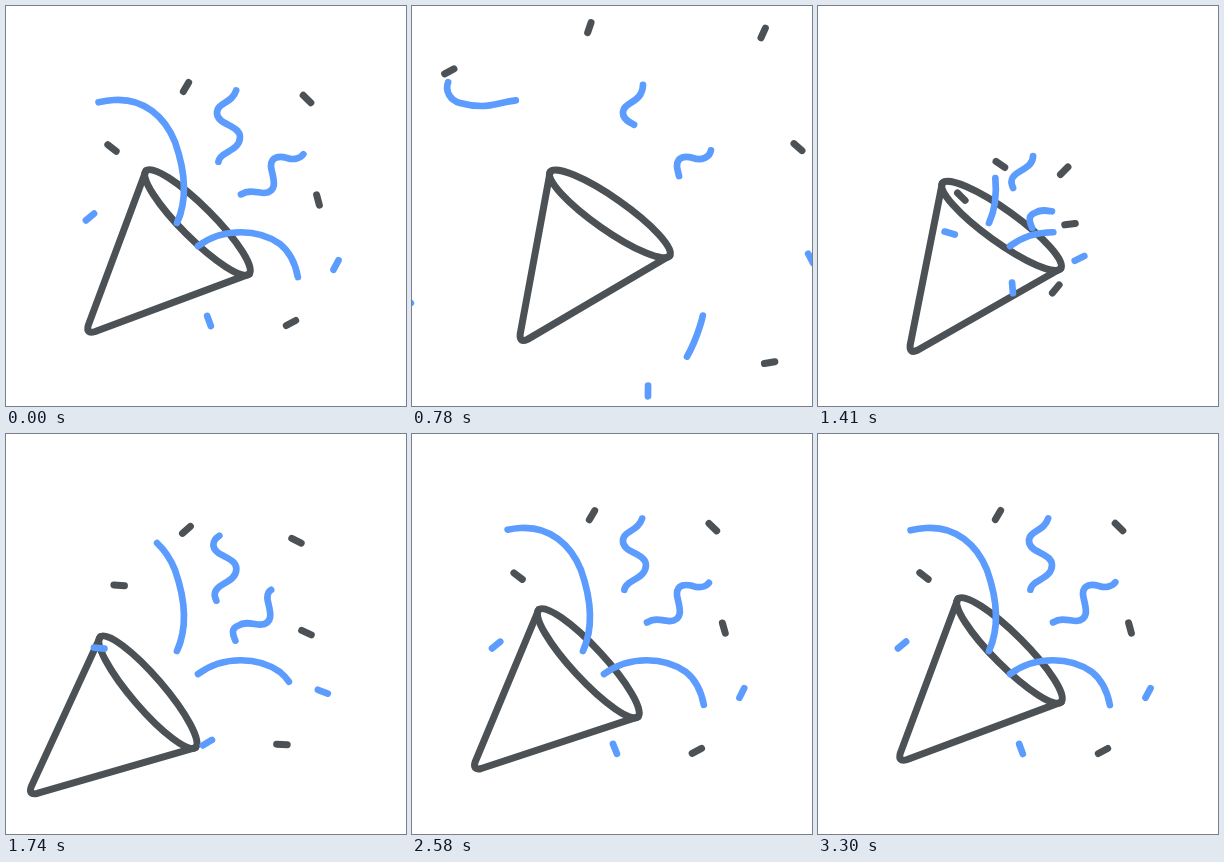
Animation of 400x400 px, one loop 5330 ms. Source, as an HTML page:

```html
<!DOCTYPE html>
<html lang="en">
<head>
<meta charset="utf-8">
<title>Party popper</title>
<style>
html, body { margin: 0; width: 100%; height: 100%; overflow: hidden; background: #fff; }
svg { display: block; width: 100%; height: 100%; }
path, ellipse { fill: none; stroke: #4b5154; stroke-width: 7; stroke-linecap: round; stroke-linejoin: round; }
.blue { stroke: #5c9cff; stroke-width: 6.7; }
</style>
</head>
<body>
<svg viewBox="0 0 400 400">
  <g id="cone">
    <ellipse rx="73" ry="16"/>
    <path d="M-73,0 L-4.5,150 Q0,158 4.5,150 L73,0"/>
  </g>
</svg>
<script>
const LOOP = 5330, STEP = 30, END = 3300, BURST = 1260, RECOIL = 1680;
const svg = document.querySelector('svg'), cone = document.getElementById('cone');

const ramp = (t, a, b) => Math.min(1, Math.max(0, (t - a) / (b - a)));
const smooth = u => u * u * (3 - 2 * u);
const easeOut = (u, p) => 1 - (1 - u) ** p;
const mix = (a, b, u) => a + (b - a) * u;
const show = (el, on) => el.setAttribute('visibility', on ? 'visible' : 'hidden');
const place = (el, x, y, a) => el.setAttribute('transform', `translate(${x} ${y}) rotate(${a})`);

function addPath(d, blue) {
  const p = document.createElementNS('http://www.w3.org/2000/svg', 'path');
  p.setAttribute('d', d);
  if (blue) p.setAttribute('class', 'blue');
  return svg.appendChild(p);
}

// Distance along the path of the spot nearest to (x, y)
function lengthAt(path, [x, y]) {
  let best = 0, min = Infinity;
  for (let s = 0; s <= path.getTotalLength(); s += 0.5) {
    const p = path.getPointAtLength(s), d = Math.hypot(p.x - x, p.y - y);
    if (d < min) { min = d; best = s; }
  }
  return best;
}

// Cone poses: rim centre x, y and tilt
const rest = [191.5, 216.5, 45], charged = [201, 203.8, 30.2], recoiled = [141, 259, 49.3];

function drawCone(t) {
  if (t < RECOIL) {
    const charge = smooth(ramp(t, 0, BURST)), kick = smooth(ramp(t, BURST, RECOIL));
    place(cone, ...rest.map((v, i) => mix(mix(v, charged[i], charge), recoiled[i], kick)));
  } else {
    const back = smooth(ramp(t, RECOIL, END) ** 0.77);
    place(cone, ...rest.map((v, i) => mix(recoiled[i], v, i === 2 ? back * back : back)));
  }
}

// Each streamer shows its path between tail and head, whose resting points are given;
// flee and grow are easing powers, sway is a shift towards the cone while it shoots out
const streamers = [
  {
    d: 'M171,217 C180,197 181,170 169,136 C159,111 138,92 108,94 C93,95 82,100 70,100 C62,100 55,99 48,97 C30,92 30,68 54,63',
    tail: [171, 217], head: [93, 97], gone: 1180, flee: 1.2, grow: 3.9, sway: 0
  },
  {
    d: 'M192,240 C218,221 253,223 274,238 C294,254 298,289 288,320 C282,339 274,355 264,366',
    tail: [192, 240], head: [292, 271], gone: 1080, flee: 1, grow: 6, sway: 0
  },
  {
    d: 'M214,163 C211,157 212,153 217,149 C224,144 234,141 234,131 C234,119 211,119 211,107 C211,95 231,98 231,78',
    tail: [213, 156], head: [231, 85], gone: 1080, flee: 2.2, grow: 6.4, sway: 40
  },
  {
    d: 'M233,203 C229,194 230,190 236,188 C243,183 252,187 258,187 C275,186 265,167 265,160 C265,150 274,150 281,152 C290,155 298,151 299,144',
    tail: [235, 188], head: [297, 149], gone: 1080, flee: 2.4, grow: 4.9, sway: 40
  }
];
for (const s of streamers) {
  s.path = addPath(s.d, true);
  s.total = s.path.getTotalLength();
  s.from = lengthAt(s.path, s.tail);
  s.to = lengthAt(s.path, s.head);
}

function drawStreamer(s, t, left) {
  let tail, head;
  if (t < BURST) {
    const u = ramp(t, 0, s.gone);
    tail = mix(s.from, s.total, u ** s.flee);
    head = mix(s.to, s.total, easeOut(u, 1.3));
  } else {
    tail = s.from * smooth(ramp(t, 1740, 2220));
    head = s.to * easeOut(ramp(t, BURST, END), s.grow);
    place(s.path, -s.sway * left, s.sway * left, 0);
  }
  show(s.path, head - tail > 0.2);
  s.path.setAttribute('stroke-dasharray', `${Math.max(0.01, head - tail)} 2000`);
  s.path.setAttribute('stroke-dashoffset', -tail);
}

// Confetti: resting x, y, angle; drift and turn on leaving; turn left shortly after the burst
const bits = [
  [180, 81, -60, -2, -45, 264, -18],
  [106, 142, 38, -52, -58, 222, 33],
  [301, 93, 44, 38, -50, -83, 17],
  [312, 194, 75, 56, -40, 247, 50],
  [285, 317, -28, 55, 30, 286, -30],
  [84, 211, -40, -68, 67, 282, -45],
  [330, 259, -62, 52, -5, 230, 96],
  [203, 315, 70, 25, 53, 152, 100]
].map((b, i) => [addPath('M-5.3,0 H5.3', i > 4), ...b]);

function drawBit([el, x, y, a, dx, dy, turn, spin], t, left) {
  if (t < BURST) {
    const f = 1.54 * (1 - Math.exp(-t / 400));
    show(el, t < (y < 150 ? 1200 : 1110));
    place(el, x + dx * f, y + dy * f, a + turn * f);
  } else {
    show(el, true);
    place(el, mix(x, 185, left), mix(y, 245, left), a - spin * left / 0.09);
  }
}

function draw(t) {
  const left = Math.exp(-(t - BURST) / 200);
  drawCone(t);
  for (const s of streamers) {
    if (t < BURST) place(s.path, 0, 0, 0);
    drawStreamer(s, t, left);
  }
  for (const b of bits) drawBit(b, t, left);
}

const start = performance.now();
function tick() {
  const t = (performance.now() - start) % LOOP;
  draw(Math.min(END, Math.floor(t / STEP) * STEP));
  requestAnimationFrame(tick);
}
tick();
</script>
</body>
</html>
```
